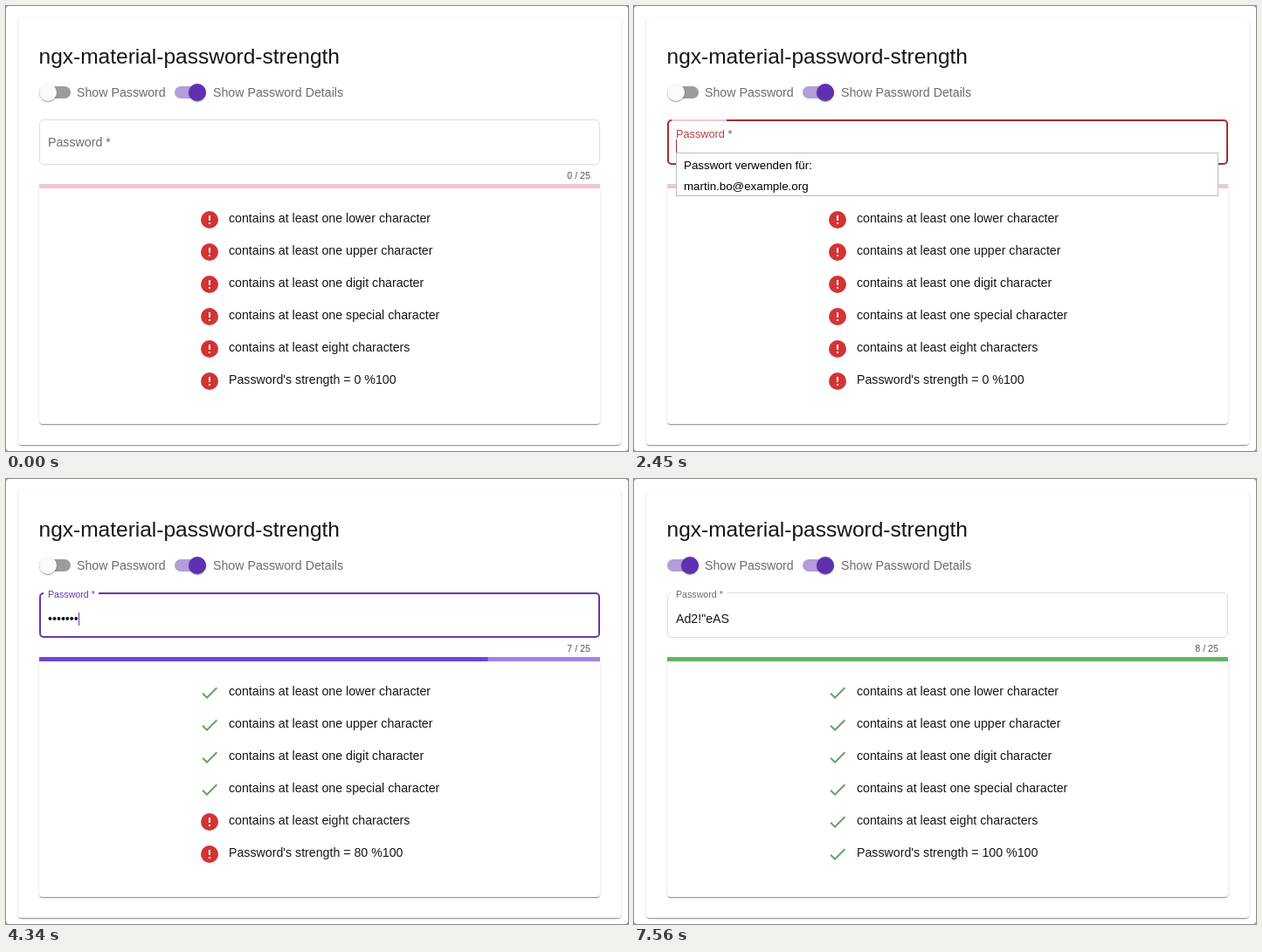
These frames come from a looping animation (712x510 px, 8.75 s). An HTML page:

```html
<!DOCTYPE html>
<html lang="en">
<head>
<meta charset="utf-8">
<title>Password strength</title>
<style>
html, body { margin: 0; width: 100%; height: 100%; overflow: hidden; background: #fff; }
#stage { position: relative; width: 712px; height: 510px; overflow: hidden; background: #999; }
#stage > *, .thumb, .ripple { position: absolute; box-sizing: border-box; }
.window { inset: 0; border-radius: 4px; background: #fff; }
.card {
  border-radius: 4px; background: #fff;
  box-shadow: 0 2px 1px -1px rgba(0,0,0,.24), 0 1px 1px rgba(0,0,0,.17), 0 1px 3px rgba(0,0,0,.14);
}
.outer { left: 14px; top: 13px; width: 690px; height: 490px; }
.inner { left: 38px; top: 207px; width: 642px; height: 272px; }
.track { top: 92px; width: 36px; height: 14px; border-radius: 7px; }
.thumb {
  left: 0; top: -3px; width: 20px; height: 20px; border-radius: 50%;
  box-shadow: 0 2px 1px -1px rgba(0,0,0,.2), 0 1px 1px rgba(0,0,0,.14), 0 1px 3px rgba(0,0,0,.12);
}
.ripple { left: -10px; top: -13px; width: 40px; height: 40px; border-radius: 50%; opacity: 0; }
svg { left: 0; top: 0; font: 14.2px "Liberation Sans", Arial, sans-serif; fill: #161616; }
text { white-space: pre; }
</style>
</head>
<body>
<div id="stage">
  <div class="window"></div>
  <div class="card outer"></div>
  <div class="card inner"></div>
  <div class="track" id="showTrack" style="left:38px">
    <div class="ripple" id="hoverRipple"></div>
    <div class="ripple" id="clickRipple"></div>
    <div class="thumb" id="showThumb"></div>
  </div>
  <div class="track" style="left:193px;background:#b39ddb">
    <div class="thumb" style="left:16px;background:#5e30b2"></div>
  </div>
  <svg id="svg" width="712" height="510"></svg>
</div>
<script>
const LOOP = 8750;
const PASSWORD = 'Ad2!"eAS';
const KEYS = [2800, 3150, 3485, 3850, 4050, 4200, 4330, 4550];
const HOVER = 1580, FOCUS = 2400, BLUR = 6580, SHOW = 6650;
const RULES = [
  { text: 'contains at least one lower character', at: 2 },
  { text: 'contains at least one upper character', at: 1 },
  { text: 'contains at least one digit character', at: 3 },
  { text: 'contains at least one special character', at: 4 },
  { text: 'contains at least eight characters', at: 8 },
  { text: '', at: 8 }
];
const RED = [211, 48, 56], PURPLE = [99, 58, 176], DARK = [33, 33, 33], GREY = [108, 108, 108];
const BAR = {
  warn: ['#d32f2f', '#efc6d2'],
  accent: ['#7043d6', '#a97fe6'],
  primary: ['#66b267', '#c5e5c6']
};

// Main outline plus the piece of the top edge that opens for the label
function outline(id, inset, width) {
  const l = 38 + inset, r = 680 - inset, t = 130 + inset, b = 182 - inset, q = 5 - inset;
  const arc = (x, y) => `a${q} ${q} 0 0 1 ${x * q} ${y * q}`;
  return `<g id="${id}" fill="none" stroke-width="${width}">
    <path d="M106 ${t}H${r - q}${arc(1, 1)}V${b - q}${arc(-1, 1)}H${l + q}${arc(-1, -1)}V${t + q}${arc(1, -1)}"/>
    <path class="gap" d="M${l + q} ${t}H106"/></g>`;
}

function ruleRow({ text }, i) {
  const y = 37 * i;
  return `<g transform="translate(0 ${y})">
    <g id="bad${i}"><circle cx="233" cy="245" r="10" fill="#d23434"/>
      <path d="M232 240h2v6h-2zM232 248h2v2h-2z" fill="#fff"/></g>
    <path id="ok${i}" fill="#5fa463" transform="translate(221 233)"
      d="M9 16.2L4.8 12l-1.4 1.4L9 19 21 7l-1.4-1.4z"/>
    <text id="rule${i}" x="255" y="248">${text}</text></g>`;
}

svg.innerHTML = `
  <text x="37.5" y="66" font-size="24.5">ngx-material-password-strength</text>
  <g fill="#6c6c6c"><text x="81" y="104">Show Password</text>
    <text x="237" y="104">Show Password Details</text></g>
  ${outline('thin', .5, 1)}${outline('thick', 1, 2)}
  <text id="label">Password <tspan id="star">*</tspan></text>
  <text id="value" x="48" y="165"></text>
  <rect id="caret" y="153" width="1" height="15"/>
  <text id="count" x="669" y="198" font-size="10.7" text-anchor="end" fill="#555"></text>
  <rect id="buffer" x="38" y="204" width="642" height="5"/>
  <rect id="fill" x="38" y="204" height="5"/>
  ${RULES.map(ruleRow).join('')}
  <g id="popup" font-size="13.35" fill="#000">
    <rect x="48.5" y="168.5" width="620" height="49" fill="#fff" stroke="#b3c0c8"/>
    <text x="57" y="187">Passwort verwenden für:</text>
    <text x="57" y="211">martin.bo@example.org</text>
  </g>`;

const $ = id => document.getElementById(id);
const set = (id, attrs) => { for (const k in attrs) $(id).setAttribute(k, attrs[k]); };
const show = (id, on) => { $(id).style.display = on ? '' : 'none'; };
const lerp = (a, b, p) => a + (b - a) * p;
const mix = (a, b, p) => a.map((v, i) => lerp(v, b[i], p));
const rgb = c => `rgb(${c.map(Math.round)})`;
const linear = p => p;

function bezier(x1, y1, x2, y2) {
  const at = (a, b, s) => 3 * a * s * (1 - s) ** 2 + 3 * b * s * s * (1 - s) + s ** 3;
  return x => {
    if (x <= 0 || x >= 1) return x;
    let lo = 0, hi = 1;
    for (let i = 0; i < 20; i++) {
      const mid = (lo + hi) / 2;
      if (at(x1, x2, mid) < x) lo = mid; else hi = mid;
    }
    return at(y1, y2, lo);
  };
}
const swift = bezier(.25, .8, .25, 1), ease = bezier(.25, .1, .25, 1);
const run = (t, start, duration, curve = swift) =>
  curve(Math.min(1, Math.max(0, (t - start) / duration)));
const strength = n => n >= 8 ? 100 : Math.min(n, 4) * 20;

function drawField(t, typed) {
  const blur = run(t, BLUR, 300);
  const focus = run(t, FOCUS, 180);
  const float = run(t, FOCUS, 400);
  const tint = mix(RED, PURPLE, run(t, KEYS[1], 300));
  const thick = run(t, HOVER, 600) * (1 - blur);
  const line = rgb(mix(DARK, tint, focus));

  set('thin', { stroke: '#dedede', opacity: 1 - thick });
  set('thick', { stroke: line, opacity: thick });
  document.querySelectorAll('.gap').forEach(g => g.setAttribute('opacity', 1 - focus));

  set('label', {
    transform: `translate(48 ${lerp(161, 135.5, float)}) scale(${lerp(1, .75, float)})`,
    fill: rgb(mix(mix(GREY, tint, focus), GREY, blur))
  });
  set('star', { fill: rgb(mix(mix(GREY, PURPLE, focus), GREY, blur)) });

  $('value').textContent = t < SHOW ? '•'.repeat(typed) : PASSWORD;
  $('count').textContent = typed + ' / 25';

  const wake = (typed ? KEYS[typed - 1] : FOCUS) + 70;
  const blinkOn = Math.floor(Math.max(0, t - wake) / 560) % 2 === 0;
  show('caret', t >= FOCUS && t < BLUR && blinkOn);
  set('caret', { x: 48 + Math.round(typed * 4.95), fill: line });
  show('popup', t >= FOCUS + 20 && !typed);
}

function drawStrength(t, typed) {
  const value = strength(typed);
  const [full, rest] = BAR[value > 80 ? 'primary' : value > 20 ? 'accent' : 'warn'];
  const grown = typed ? lerp(strength(typed - 1), value, run(t, KEYS[typed - 1], 250, ease)) : 0;
  set('buffer', { fill: rest });
  set('fill', { fill: full, width: 6.42 * grown });
  RULES.forEach((rule, i) => {
    show('ok' + i, typed >= rule.at);
    show('bad' + i, typed < rule.at);
  });
  $('rule5').textContent = `Password's strength = ${value} %100`;
}

function drawToggle(t) {
  const on = run(t, SHOW, 80, linear);
  const thumb = $('showThumb').style;
  thumb.transform = `translateX(${16 * on}px)`;
  thumb.background = rgb(mix([250, 250, 250], [94, 48, 178], on));
  $('showTrack').style.background = rgb(mix([156, 156, 156], [179, 157, 219], on));

  const tint = rgb(mix([0, 0, 0], [94, 48, 178], on));
  const hover = $('hoverRipple').style, click = $('clickRipple').style;
  hover.background = click.background = tint;
  hover.opacity = .04 * (run(t, 6290, 200) - run(t, 7200, 400));
  hover.transform = `translateX(${16 * on}px)`;
  click.opacity = .1 * (run(t, BLUR, 60, linear) - run(t, 6730, 340, linear));
  click.transform = `translateX(${16 * on}px) scale(${run(t, BLUR, 150)})`;
}

const began = performance.now();
function frame() {
  const t = (performance.now() - began) % LOOP;
  const typed = KEYS.filter(k => k <= t).length;
  drawField(t, typed);
  drawStrength(t, typed);
  drawToggle(t);
  requestAnimationFrame(frame);
}
frame();
</script>
</body>
</html>
```
